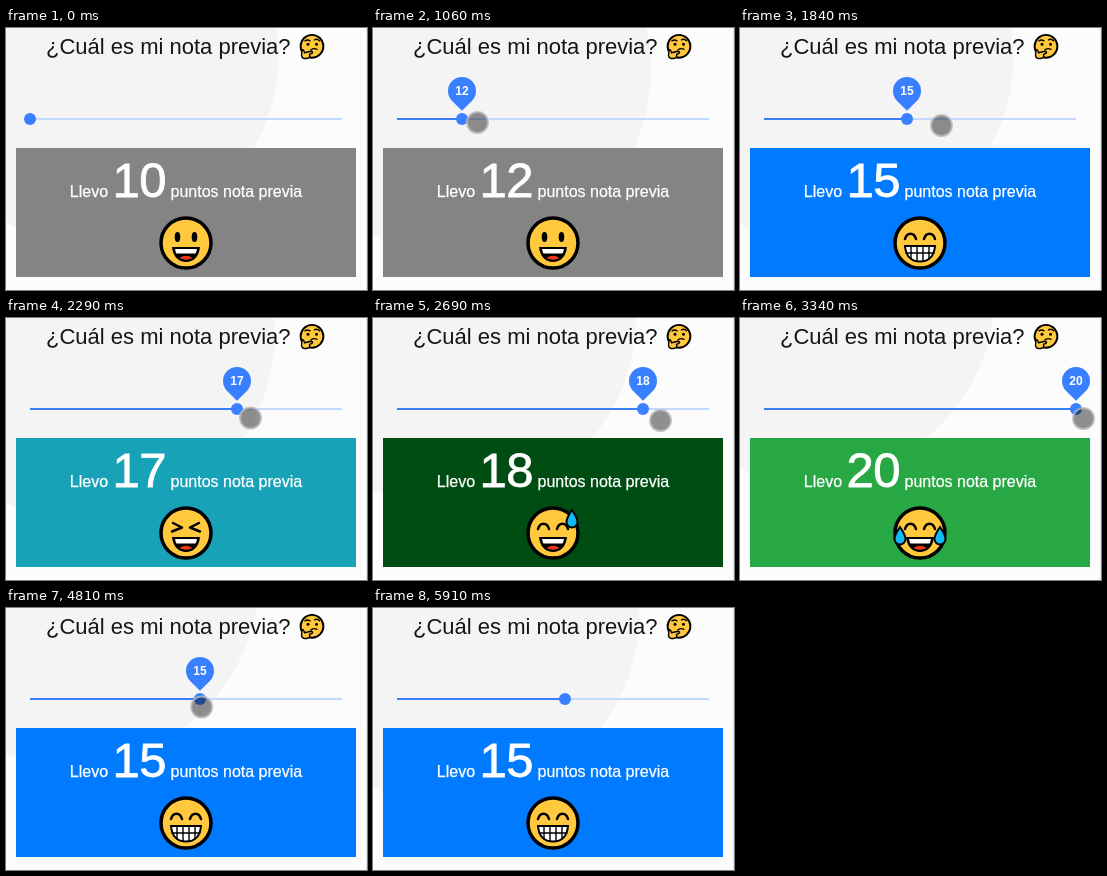
Write an HTML page that moves like this. It is 361 px wide and 262 px high and loops after 6.3 s.

```html
<!DOCTYPE html>
<html lang="es">
<head>
<meta charset="utf-8">
<title>Nota previa</title>
<style>
html, body { margin: 0; width: 361px; height: 262px; overflow: hidden; background: #fcfcfc; }
svg { display: block; font-family: Arial, "Liberation Sans", sans-serif; }
.face { fill: #ffc83d; stroke: #000; }
.line { fill: none; stroke: #000; stroke-linecap: round; stroke-linejoin: round; }
.mood { display: none; stroke-width: 2.5; }
.mood.on { display: inline; }
</style>
</head>
<body>
<svg width="361" height="262" viewBox="0 0 361 262">
  <defs>
    <g id="grin">
      <path d="M-14 4H14C13 14 7 19 0 19S-13 14 -14 4Z"/>
      <path d="M-11 6H11Q10.500 9 9.500 10.500H-9.500Q-10.500 9 -11 6Z" fill="#fff"/>
      <path d="M-6.500 15Q0 10.500 6.500 15Q0 18.500 -6.500 15Z" fill="#f03a17"/>
    </g>
    <path id="arcs" class="line" d="M-15 -4C-13 -11 -6 -11 -4 -4M4 -4C6 -11 13 -11 15 -4"/>
    <path id="drop" d="M0 -10C4 -4 5.500 -2 5.500 2A5.500 5.500 0 0 1 -5.500 2C-5.500 -2 -4 -4 0 -10Z" fill="#12b9f7" stroke="#000" stroke-width="2"/>
  </defs>

  <circle id="blob" r="188" fill="#f4f4f4"/>
  <path d="M360.5 0V262" stroke="#e6e6e6"/>

  <text x="40" y="26" font-size="22" fill="#151515">¿Cuál es mi nota previa?</text>
  <g transform="translate(306 18.3)">
    <circle class="face" r="11.400" stroke-width="1.900"/>
    <path class="line" stroke-width="1.400" d="M-7 -5.500Q-4.500 -7 -2 -5.500M2.500 -6.500Q5 -8 7.500 -5.500M-1 3.500Q2 1.500 5 3"/>
    <circle cx="-4" cy="-2" r="1.5"/><circle cx="4.500" cy="-2" r="1.5"/>
    <path class="face" stroke-width="1.400" stroke-linejoin="round" d="M-10 4Q-8.500 2 -7.500 6.500L-1 5Q1.500 5.500 0 7L-2.500 8Q-1.500 11.500 -4.500 12Q-10 13 -10.500 9Z"/>
  </g>

  <rect x="24" y="90" width="312" height="2" fill="#c3d9ff"/>
  <rect id="bar" x="24" y="90" height="2" fill="#3880ff"/>
  <circle id="knob" cy="91" r="6" fill="#3880ff"/>
  <g id="pin">
    <path d="M0 19.8L-9.900 9.900A14 14 0 1 1 9.900 9.900Z" fill="#3880ff"/>
    <text id="pinText" y="4.300" font-size="12" font-weight="bold" fill="#fff" text-anchor="middle"></text>
  </g>

  <rect id="panel" x="10" y="120" width="340" height="129"/>
  <text x="180" y="168.700" font-size="16" fill="#fff" stroke="#fff" stroke-width=".25" text-anchor="middle">Llevo <tspan id="score" font-size="49" letter-spacing="-.5" stroke-width=".8"></tspan> puntos nota previa</text>

  <g transform="translate(180 215)">
    <circle class="face" r="25" stroke-width="3.500"/>
    <g class="mood">
      <ellipse cx="-8.500" cy="-6" rx="2.800" ry="5"/><ellipse cx="8.500" cy="-6" rx="2.800" ry="5"/>
      <use href="#grin"/>
    </g>
    <g class="mood">
      <use href="#arcs"/>
      <path d="M-15 3H15C14 14 9 18.500 0 18.500S-14 14 -15 3Z" fill="#fff" stroke="#000" stroke-width="2"/>
      <path class="line" stroke-width="1.400" d="M-14 10H14M-9 4V16M-3 4V18M3 4V18M9 4V16"/>
    </g>
    <g class="mood">
      <path class="line" d="M-13 -10L-4 -5.500L-14 -1.500M13 -10L4 -5.500L14 -1.500"/>
      <use href="#grin"/>
    </g>
    <g class="mood">
      <use href="#arcs"/><use href="#grin"/>
      <use href="#drop" x="19" y="-13"/>
    </g>
    <g class="mood">
      <use href="#arcs"/><use href="#grin"/>
      <use href="#drop" x="-20" y="4"/><use href="#drop" x="20" y="4"/>
    </g>
  </g>

  <circle id="touch" r="10.500" fill="rgba(0,0,0,.43)" stroke="rgba(185,185,185,.8)" stroke-width="2"/>
</svg>
<script>
const LOOP = 6300, IDLE = 230, STEP = 134;
const LEFT = 24, WIDTH = 312;

// Key points: step, x (and y)
const knobPath = [[3, LEFT], [6, 89], [9, 114], [12, 167], [13, 205], [18, 270], [23, 336],
  [26, 336], [27, 305], [28, 240], [31, 206], [33, 195], [36, 192]];
const touchPath = [[0, 22.5, 91.5], [3, 25.5, 92.5], [6, 104.5, 94.5], [12, 201.5, 97.5],
  [18, 287.5, 102.5], [23, 343.5, 100.5], [26, 343.5, 100.5], [28, 230.5, 95.5],
  [33, 194.5, 96.5], [36, 198, 104], [38, 210.5, 149.5], [41, 292.5, 210.5]];

const levels = [
  { from: 10, color: "#848484" },
  { from: 13, color: "#007bff" },
  { from: 17, color: "#17a2b8" },
  { from: 18, color: "#004d13" },
  { from: 19, color: "#28a745" }
];

const $ = id => document.getElementById(id);
const moods = document.querySelectorAll(".mood");

function set(id, attrs) {
  for (const name in attrs) $(id).setAttribute(name, attrs[name]);
}

function show(id, on) {
  set(id, { visibility: on ? "visible" : "hidden" });
}

function sample(path, n) {
  const next = path.findIndex(p => p[0] > n);
  if (next < 1) return path.at(next).slice(1);
  const a = path[next - 1], b = path[next];
  const k = (n - a[0]) / (b[0] - a[0]);
  return a.slice(1).map((v, i) => v + (b[i + 1] - v) * k);
}

function draw(n) {
  const [x] = sample(knobPath, n);
  const [cx, cy] = sample(touchPath, n);
  const score = Math.round(10 + 10 * (x - LEFT) / WIDTH);
  const level = levels.findLastIndex(l => l.from <= score);

  const sway = Math.cos(2 * Math.PI * (IDLE + n * STEP - 1000) / LOOP);
  set("blob", { cx: 76 + 14 * sway, cy: 2 + 40 * sway });

  set("bar", { width: x - LEFT });
  set("knob", { cx: x });
  set("pin", { transform: `translate(${x} 63)` });
  show("pin", n >= 4 && n <= 36);
  $("pinText").textContent = $("score").textContent = score;

  set("panel", { fill: levels[level].color });
  moods.forEach((m, i) => m.classList.toggle("on", i === level));

  set("touch", { cx, cy });
  show("touch", n >= 0 && n < 42 && n !== 26);
}

let start, shown;
function frame(now) {
  start ??= now;
  const t = (now - start) % LOOP;
  const n = Math.min(42, Math.max(-1, Math.floor((t - IDLE) / STEP)));
  if (n !== shown) draw(shown = n);
  requestAnimationFrame(frame);
}
draw(-1);
requestAnimationFrame(frame);
</script>
</body>
</html>
```
